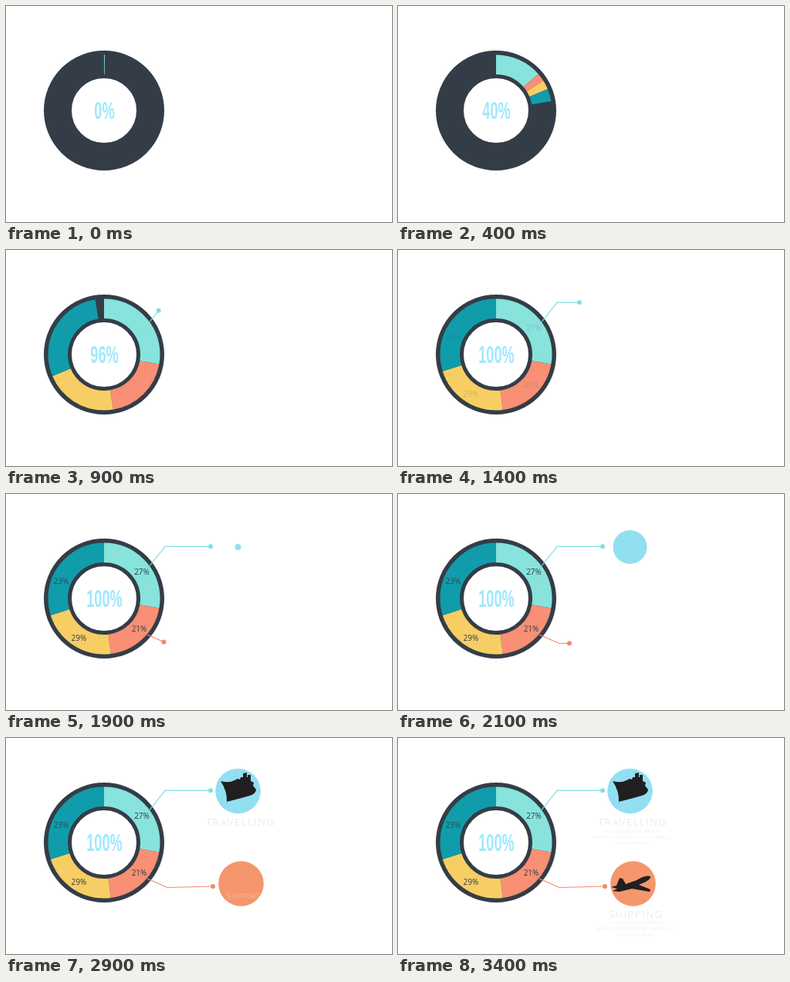
An HTML page for the animation above (4000 ms loop, 500 px wide and 281 px high).

```html
<!DOCTYPE html>
<html lang="en">
<head>
<meta charset="utf-8">
<title>Donut chart</title>
<style>
  html, body { margin: 0; width: 100%; height: 100%; overflow: hidden; background: #fff; }
  svg { display: block; width: 500px; height: 281px; }
  text { text-anchor: middle; font-family: "Open Sans", "Noto Sans", sans-serif; }
  .total { font: bold 32px "Liberation Sans", Arial, sans-serif; fill: #a0e8fc; }
  .labels { font-size: 10px; fill: #2f3d47; }
  .title { font-size: 13.5px; letter-spacing: 1.2px; fill: #e9edef; }
  .note { font-size: 6px; fill: #eceff1; }
  .ring, .lead { fill: none; }
</style>
</head>
<body>
<svg viewBox="0 0 500 281">
  <circle class="ring" cx="127" cy="136" r="60" stroke="#343d47" stroke-width="36"/>
  <g id="wedges" transform="rotate(-90 127 136)"></g>
  <text class="total" id="total" transform="translate(127.5 146.5) scale(.57 1)"></text>
  <g class="labels" id="labels">
    <text x="176" y="104.5">27%</text>
    <text x="172.5" y="178.7">21%</text>
    <text x="94.3" y="190.5">29%</text>
    <text x="71.5" y="116.7" opacity=".85">23%</text>
  </g>
  <g id="leads"></g>
  <g id="badges"></g>
</svg>

<template id="ship">
  <path fill="#211f20" d="M278 56Q289 59 296 55L300 53 303 54 304 51 307 51 307 46 312 45 312 51 313 51 313 48 317 48 317 56 321 58 320 62 324 67Q324 72 316 75Q302 79 286 83Q287 70 278 56Z"/>
  <path fill="none" stroke="#92dff1" stroke-width=".8" d="M301 56L317 59M303 60L319 63M307 64L321 67M306 53L314 55"/>
  <path fill="#f3efe0" d="M281 60L287 62 286 63 282 62ZM288 66L291 67 290 69Z"/>
  <path fill="none" stroke="#211f20" d="M278 84Q290 85 302 82T326 84M281 87H304M309 86.5H325M286 90H299M303 89.5H318"/>
</template>
<template id="plane">
  <path fill="#211f20" d="M276 194L283 192 287 182 291 183 295 190 309 185Q321 178 327 180Q328 183 321 187L312 191 327 197 326 200 303 196 287 200 278 199 284 196Z"/>
  <path fill="#211f20" d="M301 187L290 181 293 180 309 185ZM306 195h6v5h-6zM290 197h5v4h-5z"/>
  <path fill="none" stroke="#f5966c" stroke-width=".8" d="M289 194L318 185M307 193L322 198"/>
</template>

<script>
const $ = id => document.getElementById(id);
const STEP = 100, LOOP = 4000, LAST = 34;

function add(parent, tag, attrs = {}, text = "") {
  const el = document.createElementNS("http://www.w3.org/2000/svg", tag);
  for (const k in attrs) el.setAttribute(k, attrs[k]);
  el.textContent = text;
  parent.append(el);
  return el;
}
const set = (el, k, v) => el.setAttribute(k, v);
const clamp = v => Math.max(0, Math.min(1, v));
const at = (table, i) => table[Math.min(table.length - 1, i)];

// Growth per step
const lead = [.008, .03, .12, .28, .49, .69, .85, .94, .98, 1];
const rest = [0, 0, .01, .04, .12, .36, .65, .82, .92, .965, .98, .99, .995, 1];
const count = [0, 3, 12, 25, 40, 56, 71, 83, 91, 96, 99, 100];

const wedges = [
  { span: 100, color: "#87e3dc", grow: lead },
  { span: 73, color: "#f98f74", grow: rest },
  { span: 79.5, color: "#f6ce63", grow: rest },
  { span: 107.5, color: "#109caa", grow: rest }
];
for (const w of wedges) {
  w.el = add($("wedges"), "circle", {
    class: "ring", cx: 127, cy: 136, r: 59.75, pathLength: 360,
    stroke: w.color, "stroke-width": 25.5
  });
}

const leads = [
  { start: 6.8, speed: 8.5, color: "#82dfdf", pts: [[186, 93.5], [206, 68.3], [265, 68.3]] },
  { start: 16.4, speed: 9, color: "#f5876b", pts: [[183, 183], [209, 194.5], [268, 193]] }
];
for (const l of leads) {
  l.line = add($("leads"), "polyline", { class: "lead", stroke: l.color, "stroke-width": 1.2 });
  l.dot = add($("leads"), "circle", { r: 3, fill: l.color });
}

const badges = [
  {
    x: 300.5, y: 69, color: "#92dff1", icon: "ship", start: 19, sizes: [4, 14, 22, 27, 29.3],
    iconAt: 22, title: "TRAVELLING", titleAt: 25, tx: 303.6, ty: 114, rise: 21,
    last: "DESIRE FOR DAY"
  },
  {
    x: 304.5, y: 189.5, color: "#f5966c", icon: "plane", start: 26, sizes: [4, 14, 24, 29.3],
    iconAt: 30, title: "SHIPPING", titleAt: 29, tx: 308, ty: 233.5, rise: 25,
    last: "EACH DAY OR SO"
  }
];
for (const b of badges) {
  const g = $("badges");
  b.disc = add(g, "circle", { cx: b.x, cy: b.y, fill: b.color });
  b.art = add(g, "g");
  b.art.innerHTML = $(b.icon).innerHTML;
  b.head = add(g, "text", { class: "title" }, b.title);
  b.notes = add(g, "g", { class: "note" });
  ["ALL AROUND THE WORLD", "WITH A MINIMUM COST ALLOW US", b.last].forEach((s, i) =>
    add(b.notes, "text", { x: b.tx - .5, y: b.ty + 8.5 + i * 8, "letter-spacing": i === 1 ? .1 : 0 }, s));
}

function drawLead(l, n) {
  let left = Math.max(0, (n - l.start) * l.speed);
  const show = left > 0 ? 1 : 0;
  let tip = l.pts[0];
  const path = [tip];
  for (const p of l.pts.slice(1)) {
    const dx = p[0] - tip[0], dy = p[1] - tip[1], len = Math.hypot(dx, dy);
    const k = Math.min(1, left / len);
    tip = [tip[0] + dx * k, tip[1] + dy * k];
    path.push(tip);
    left -= len;
    if (left <= 0) break;
  }
  set(l.line, "points", path.join(" "));
  set(l.line, "opacity", show);
  set(l.dot, "cx", tip[0]);
  set(l.dot, "cy", tip[1]);
  set(l.dot, "opacity", show);
}

function drawBadge(b, n) {
  set(b.disc, "r", n < b.start ? 0 : at(b.sizes, n - b.start));
  set(b.art, "opacity", clamp((n - b.iconAt) / 2));
  const k = clamp((n - b.titleAt) / 4), ease = k * (2 - k);
  const size = .6 + .4 * ease;
  set(b.head, "transform", `translate(${b.tx} ${b.ty - b.rise * (1 - ease)}) scale(${size})`);
  set(b.head, "opacity", n < b.titleAt ? 0 : .45 + .55 * k);
  set(b.notes, "opacity", clamp((n - b.titleAt - 4)));
}

function draw(n) {
  let from = 0;
  for (const w of wedges) {
    const size = w.span * at(w.grow, n);
    set(w.el, "stroke-dasharray", `${size} 400`);
    set(w.el, "stroke-dashoffset", -from);
    set(w.el, "opacity", size ? 1 : 0);
    from += size;
  }
  $("total").textContent = at(count, n) + "%";
  set($("labels"), "opacity", clamp((n - 13) / 6));
  for (const l of leads) drawLead(l, n);
  for (const b of badges) drawBadge(b, n);
}

function frame() {
  draw(Math.min(LAST, Math.floor(performance.now() % LOOP / STEP)));
  requestAnimationFrame(frame);
}
frame();
</script>
</body>
</html>
```
